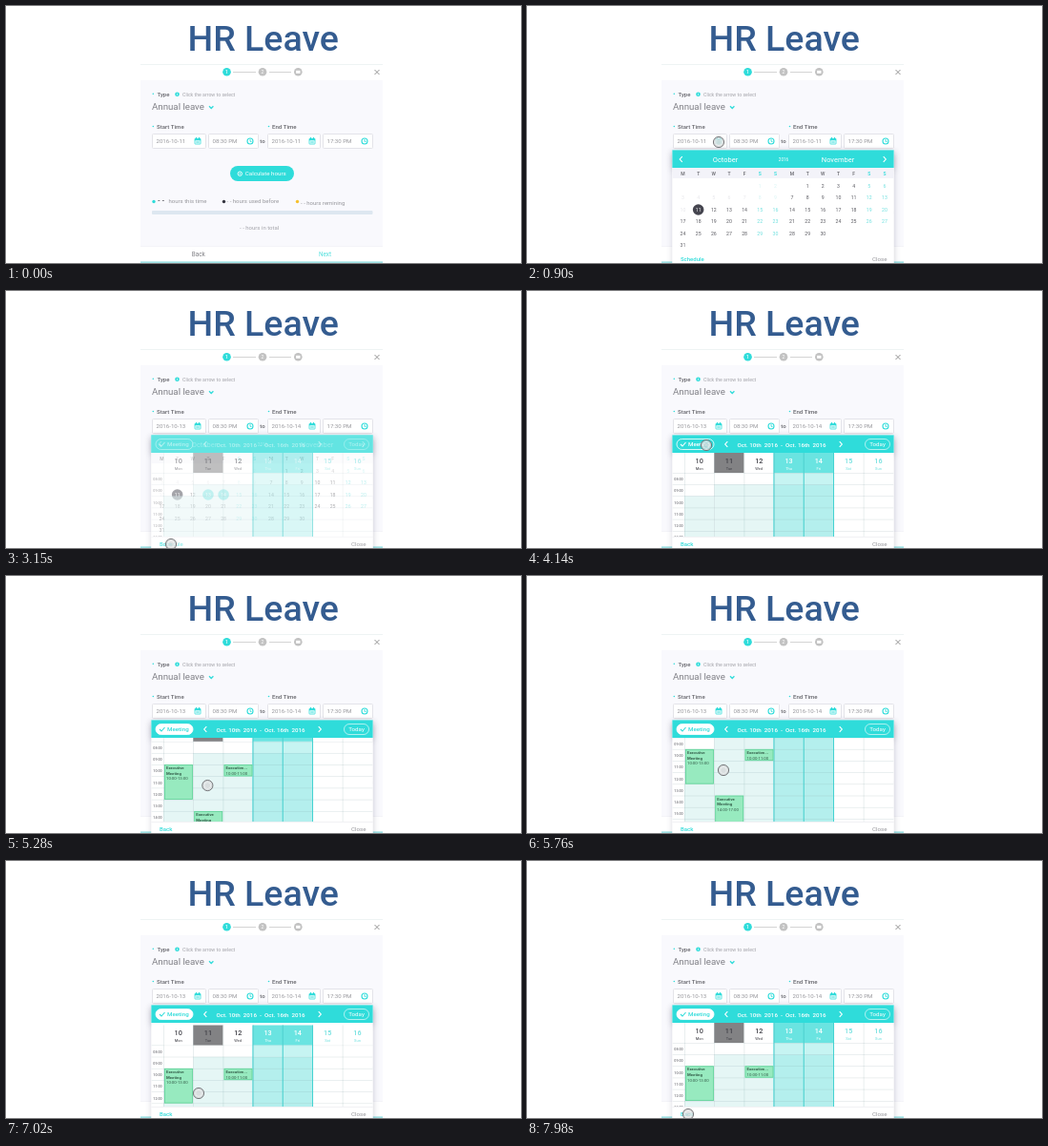
An HTML page with a canvas for the animation above (8 s loop, 540 px wide and 270 px high).

```html
<!DOCTYPE html>
<html lang="en">
<head>
<meta charset="utf-8">
<title>HR Leave</title>
<style>
html, body { margin: 0; width: 100%; height: 100%; overflow: hidden; background: #fff; }
canvas { display: block; }
</style>
</head>
<body>
<canvas id="stage" width="540" height="270"></canvas>
<script>
const ctx = document.getElementById('stage').getContext('2d');
const LOOP = 8000;
const TEAL = '#2fdcda', GRAY = '#97979c', DARK = '#66666c';
const POP_X = 152.5, POP_Y = 151.5, POP_W = 232, BAR_H = 18.5;
const DAY_X = 165, DAY_W = 31.3, HOUR_H = 12.2, GRID_TOP = 170, HEAD_BOTTOM = 191;

// Keyframes: [time, ...values]
const CURSOR = [
  [120, 226, 168], [450, 201, 143], [950, 201, 143], [1600, 212, 214], [1700, 212, 214],
  [2150, 228, 214], [2450, 228, 214], [3000, 173, 266], [3250, 173, 266],
  [3950, 188, 162], [4300, 188, 162], [4850, 217, 237], [4950, 217, 237],
  [5600, 206, 204], [5800, 206, 204], [6300, 204, 209], [6400, 204, 209],
  [6950, 202, 244], [7150, 202, 244], [7850, 169, 266]
];
const SCROLL = [[4950, 0], [5600, -33.5], [6400, -33.5], [6950, 2.5], [7150, 2.5], [7400, 0]];

function ramp(t, from, to) {
  const u = Math.min(1, Math.max(0, (t - from) / (to - from)));
  return u * u * (3 - 2 * u);
}
function track(keys, t) {
  const next = keys.findIndex(key => key[0] > t);
  if (next === 0) return keys[0].slice(1);
  if (next < 0) return keys[keys.length - 1].slice(1);
  const a = keys[next - 1], b = keys[next], u = ramp(t, a[0], b[0]);
  return a.slice(1).map((v, i) => v + (b[i + 1] - v) * u);
}

function text(str, x, y, size, color, { weight = 400, align = 'left' } = {}) {
  ctx.font = `${weight} ${size}px Roboto, sans-serif`;
  ctx.textAlign = align;
  ctx.fillStyle = color;
  ctx.fillText(str, x, y);
}
function centered(str, x, y, size, color, weight = 400) {
  text(str, x, y, size, color, { weight, align: 'center' });
}
function rect(x, y, w, h, color) {
  ctx.fillStyle = color;
  ctx.fillRect(x, y, w, h);
}
function rounded(x, y, w, h, r, fill, stroke) {
  ctx.beginPath();
  ctx.roundRect(x, y, w, h, r);
  paint(fill, stroke, 0.8);
}
function circle(x, y, r, fill, stroke, width = 1) {
  ctx.beginPath();
  ctx.arc(x, y, r, 0, 7);
  paint(fill, stroke, width);
}
function paint(fill, stroke, width) {
  if (fill) { ctx.fillStyle = fill; ctx.fill(); }
  if (stroke) { ctx.strokeStyle = stroke; ctx.lineWidth = width; ctx.stroke(); }
}
function line(color, width, ...points) {
  ctx.beginPath();
  for (let i = 0; i < points.length; i += 2) ctx.lineTo(points[i], points[i + 1]);
  paint(null, color, width);
}
function layer(alpha, draw) {
  if (alpha <= 0) return;
  ctx.save();
  ctx.globalAlpha *= alpha;
  draw();
  ctx.restore();
}
function clip(x, y, w, h) {
  ctx.beginPath();
  ctx.rect(x, y, w, h);
  ctx.clip();
}

function field(x, w, value, icon) {
  rounded(x + 0.5, 134.5, w, 15, 1, '#fff', '#dedee4');
  text(value, x + 4.5, 144.2, 6.1, GRAY);
  const cx = x + w - 8, cy = 142;
  if (icon === 'clock') {
    circle(cx, cy, 3, null, TEAL, 1.1);
    line(TEAL, 0.9, cx, cy - 1.8, cx, cy + 0.3, cx + 1.5, cy + 0.3);
  } else {
    rounded(cx - 3, cy - 2.7, 6, 5.7, 0.5, null, TEAL);
    rect(cx - 3, cy - 2.7, 6, 2, TEAL);
    rect(cx - 2, cy - 4, 1, 2, TEAL);
    rect(cx + 1, cy - 4, 1, 2, TEAL);
    rect(cx - 1.8, cy + 0.5, 3.6, 1, TEAL);
  }
}

function drawForm(t) {
  rect(0, 0, 540, 270, '#fff');
  centered('HR Leave', 269.7, 47, 37.5, '#345c90', 500);
  rect(141, 61, 254, 1, '#eef3f4');
  rect(141, 78, 254, 174, '#f9f9fd');

  line('#d4d4d4', 1, 238, 69.5, 262, 69.5);
  line('#d4d4d4', 1, 276, 69.5, 299, 69.5);
  circle(231.5, 69.3, 4.3, TEAL);
  circle(269, 69.3, 4.3, '#c2c2c2');
  circle(306.3, 69.3, 4.3, '#c2c2c2');
  centered('1', 231.5, 71.1, 5, '#fff', 500);
  centered('2', 269, 71.1, 5, '#fff');
  rect(304.1, 67.8, 4.4, 3, '#fff');
  line('#888', 0.9, 386.5, 67, 391.5, 72);
  line('#888', 0.9, 391.5, 67, 386.5, 72);

  circle(154.3, 92.3, 0.8, TEAL);
  text('Type', 158.5, 94.7, 6, DARK, { weight: 500 });
  circle(179.5, 92.8, 2.3, TEAL);
  centered('i', 179.5, 94.4, 4, '#fff', 700);
  text('Click the arrow to select', 185, 94.7, 5.2, '#a4a4aa');
  text('Annual leave', 153, 109, 9.7, '#7f7f85');
  line(TEAL, 1.3, 213, 105.3, 215.2, 107.5, 217.4, 105.3);

  circle(154.3, 126.5, 0.8, TEAL);
  text('Start Time', 158, 129.3, 6.1, DARK, { weight: 500 });
  circle(275.5, 126.5, 0.8, TEAL);
  text('End Time', 279, 129.3, 6.1, DARK, { weight: 500 });
  field(153, 56, t < 1680 ? '2016-10-11' : '2016-10-13', 'calendar');
  field(212, 52, '08:30 PM', 'clock');
  centered('to', 269, 144, 6, DARK, 500);
  field(274, 55, t < 2300 ? '2016-10-11' : '2016-10-14', 'calendar');
  field(332, 52, '17:30 PM', 'clock');

  rounded(235, 168, 67, 16, 8, TEAL);
  circle(245.3, 176.2, 2.2, null, '#fff', 0.9);
  circle(245.3, 176.2, 0.7, '#fff');
  text('Calculate hours', 250.8, 178.4, 6.2, '#fff');

  circle(155, 205.5, 1.7, TEAL);
  text('- -', 159, 207, 7, DARK, { weight: 700 });
  text('hours this time', 170.5, 207.3, 6, GRAY);
  circle(228.5, 205.5, 1.7, '#34343f');
  text('- - hours used before', 231.5, 207.3, 6, GRAY);
  circle(305.5, 205.5, 1.7, '#f6c02c');
  text('- - hours remining', 309, 208.5, 6, GRAY);
  rounded(153, 215, 231.5, 4, 1, '#dde7f0');
  text('- - hours in total', 245, 235.2, 6, '#a4a4aa');

  rect(141, 252, 254, 18, '#fff');
  rect(141, 252, 254, 0.7, '#f0f0f5');
  centered('Back', 201.7, 263, 6.4, '#808086');
  centered('Next', 334.5, 263, 6.4, '#4fdfdd');
  rect(141, 268.6, 254, 1, '#62cfd5');
}

function chevron(x, y, dir) {
  line('#fff', 1.1, x - dir * 1.3, y - 2.8, x + dir * 1.3, y, x - dir * 1.3, y + 2.8);
}

function popupBase() {
  rect(POP_X, POP_Y, POP_W, 120, '#fff');
  rect(POP_X, POP_Y, POP_W, BAR_H, TEAL);
}
function popupLinks(left) {
  text(left, 161, 268, 6, TEAL, { weight: 500 });
  text('Close', 362, 268, 6.2, GRAY);
}

function drawMonth(left, firstColumn, days, isPast, t) {
  const colX = col => left + col * 16.15;
  [...'MTWTFSS'].forEach((d, col) =>
    centered(d, colX(col), 177.6, 5, col > 4 ? TEAL : '#66666c', 500));
  for (let day = 1; day <= days; day++) {
    const cell = day - 1 + firstColumn, col = cell % 7;
    const x = colX(col), y = 214 + (Math.floor(cell / 7) - 2) * 12.4;
    const october = left < 200;
    const today = october && day === 11;
    const picked = october && (day === 13 && t >= 1680 || day === 14 && t >= 2300);
    if (today || picked) circle(x, y, 5.8, today ? '#45454f' : TEAL);
    const color = today || picked ? '#fff'
      : isPast(day) ? (col > 4 ? '#d9f4f4' : '#e6e6ea')
      : col > 4 ? '#6fe0df' : '#5c5c63';
    centered(day, x, y + 1.8, 5.2, color);
  }
}

function drawCalendar(t) {
  popupBase();
  rect(POP_X, 170, POP_W, 11, '#f3f3f9');
  chevron(161.5, 161, -1);
  chevron(375, 161, 1);
  centered('October', 208, 163.6, 7.5, '#fff');
  centered('2016', 269, 163.3, 4.6, '#fff');
  centered('November', 326, 163.6, 7.5, '#fff');
  drawMonth(163.5, 5, 31, day => day < 11, t);
  drawMonth(278, 1, 30, () => false, t);
  popupLinks('Schedule');
}

function drawMeeting(col, hour, length, lines) {
  const x = DAY_X + col * DAY_W + 1, y = HEAD_BOTTOM + (hour - 8) * HOUR_H;
  const w = DAY_W - 1.5, h = length * HOUR_H;
  rect(x, y, w, h, '#97eabf');
  ctx.strokeStyle = '#62d29a';
  ctx.lineWidth = 0.8;
  ctx.strokeRect(x + 0.4, y + 0.4, w - 0.8, h - 0.8);
  lines.forEach((str, i) =>
    text(str, x + 2, y + 5 + i * 5.6, 4.3, '#355f4b',
      { weight: i < lines.length - 1 ? 700 : 400 }));
}

function drawGrid(t) {
  const bottom = HEAD_BOTTOM + 12 * HOUR_H;
  const dayX = col => DAY_X + col * DAY_W;

  rect(dayX(0), HEAD_BOTTOM + 2 * HOUR_H, DAY_W, bottom, '#e5f6f5');
  rect(dayX(1), HEAD_BOTTOM + HOUR_H, 2 * DAY_W, bottom, '#e5f6f5');
  rect(dayX(3), HEAD_BOTTOM, 2 * DAY_W, HOUR_H, '#c6f4f2');
  rect(dayX(3), HEAD_BOTTOM + HOUR_H, 2 * DAY_W, bottom, '#b4efed');

  for (let hour = 8; hour < 20; hour++) {
    const y = HEAD_BOTTOM + (hour - 8) * HOUR_H;
    rect(POP_X, y, POP_W, 0.6, 'rgba(120,150,155,.25)');
    centered(String(hour).padStart(2, '0') + ':00', 159, y + 8.2, 3.7, '#77777d', 500);
  }

  ['Mon', 'Tue', 'Wed', 'Thu', 'Fri', 'Sat', 'Sun'].forEach((name, col) => {
    const x = dayX(col), chosen = col === 3 || col === 4;
    const color = chosen ? '#fff' : col > 4 ? '#6fe0df' : '#3f3f46';
    rect(x, GRID_TOP, DAY_W, 21, chosen ? '#6ae4e1' : col === 1 ? '#828284' : '#fff');
    centered(10 + col, x + DAY_W / 2, 180.5, 7.2, color, 500);
    centered(name, x + DAY_W / 2, 187.5, 4, color);
    rect(x, GRID_TOP, 0.6, bottom, 'rgba(120,150,155,.27)');
  });
  for (const col of [3, 4, 5]) rect(dayX(col) - 0.5, GRID_TOP, 1, bottom, '#45d3d2');

  layer(ramp(t, 4280, 4480), () => {
    drawMeeting(0, 10, 3, ['Executive', 'Meeting', '10:00-13:00']);
    drawMeeting(1, 14, 3, ['Executive', 'Meeting', '14:00-17:00']);
    drawMeeting(2, 10, 1, ['Executive...', '10:00-11:00']);
  });
}

function drawSchedule(t) {
  popupBase();
  ctx.save();
  clip(POP_X, GRID_TOP, POP_W, 88);
  ctx.translate(0, track(SCROLL, t)[0]);
  drawGrid(t);
  ctx.restore();

  const on = t >= 4250, ink = on ? TEAL : '#fff';
  rounded(157, 155.5, 39, 11, 5.5, on ? '#fff' : null, '#fff');
  line(ink, 1.1, 161, 161, 163, 163, 166.5, 159);
  text('Meeting', 169, 163.3, 6.2, ink, { weight: 500 });
  chevron(209, 161, -1);
  centered('Oct. 10th  2016  -  Oct. 16th  2016', 267, 163.5, 6.2, '#fff', 500);
  chevron(329, 161, 1);
  rounded(354.5, 155.5, 26, 11, 5.5, null, 'rgba(255,255,255,.75)');
  centered('Today', 367.5, 163.3, 6.2, '#fff');

  rect(POP_X, 258, POP_W, 0.6, '#e8e8ed');
  popupLinks('Back');
}

function drawPopup(t) {
  const open = ramp(t, 520, 760);
  layer(open, () => {
    clip(141, 145, 254, 125 * open);
    ctx.save();
    ctx.shadowColor = 'rgba(60,60,90,.28)';
    ctx.shadowBlur = 7;
    ctx.shadowOffsetY = 2;
    popupBase();
    ctx.restore();
    const swap = ramp(t, 3080, 3220);
    if (swap < 1) drawCalendar(t);
    layer(swap, () => drawSchedule(t));
  });
}

function drawCursor(t) {
  const [x, y] = track(CURSOR, t);
  layer(ramp(t, 60, 200), () => {
    circle(x, y, 5.6, 'rgba(212,214,215,.75)', '#6c6c70', 0.9);
    circle(x, y, 3.4, null, 'rgba(255,255,255,.5)', 1);
  });
}

const start = performance.now();
function frame() {
  const t = (performance.now() - start) % LOOP;
  drawForm(t);
  drawPopup(t);
  drawCursor(t);
  requestAnimationFrame(frame);
}
frame();
</script>
</body>
</html>
```
